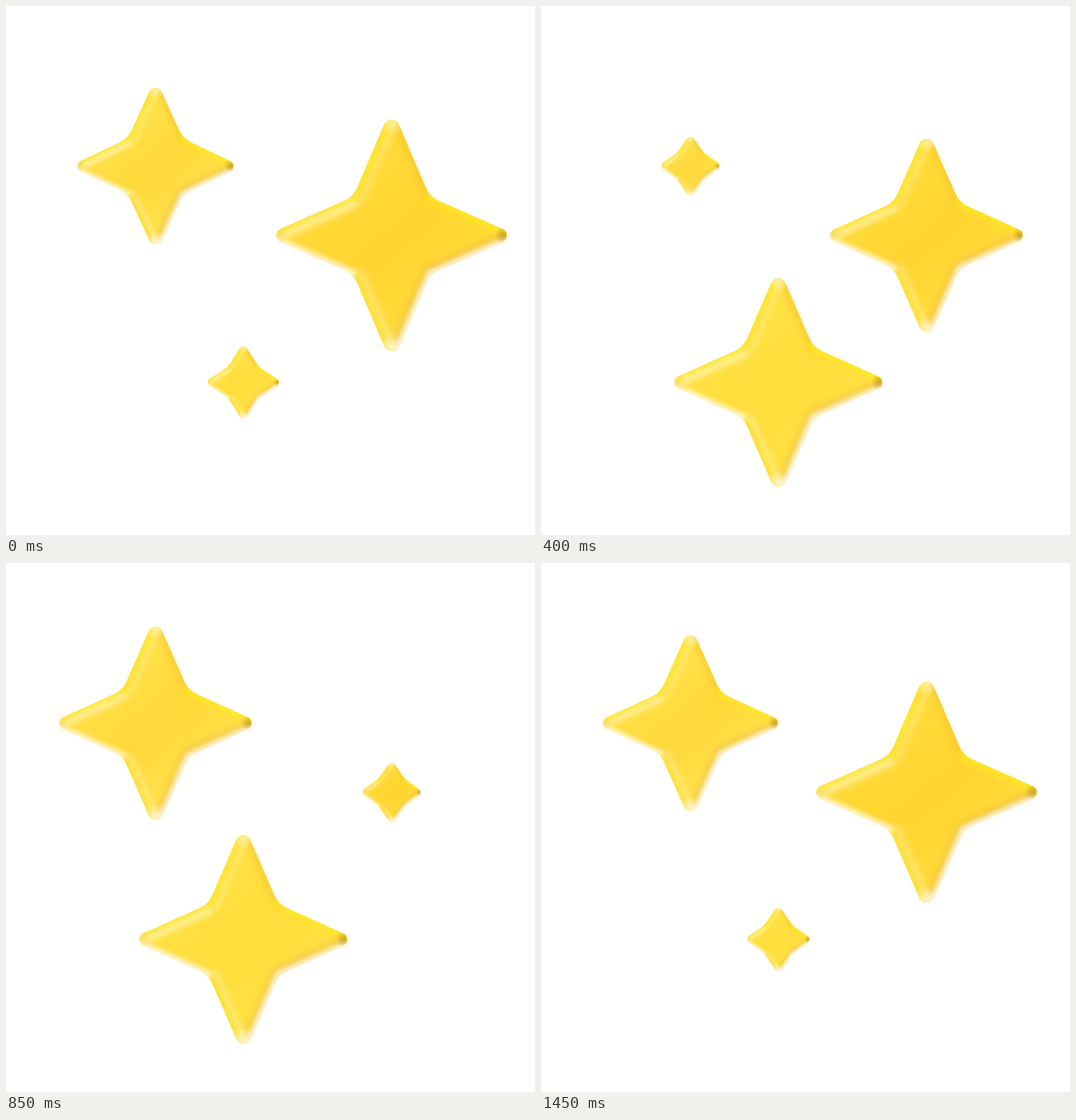
Recreate the animation shown at these times as an HTML page with a canvas. Size 600 by 600 pixels, loop 1.5 s.

```html
<!DOCTYPE html>
<html lang="en">
<head>
<meta charset="utf-8">
<title>Sparkles</title>
<style>
  html, body { margin: 0; width: 100%; height: 100%; overflow: hidden; background: #fff; }
  canvas { display: block; width: 600px; height: 600px; }
</style>
</head>
<body>
<canvas id="stage" width="600" height="600"></canvas>
<script>
const ctx = document.getElementById('stage').getContext('2d');
const LOOP = 1500, STEP = 50;

// peak: the moment at which the star is largest
const stars = [
  { x: 169.5, y: 181.5, peak: 1125, light: '#ffe148', deep: '#ffd83a' },
  { x: 437.3, y: 260, peak: 125, light: '#ffdb38', deep: '#ffd430' },
  { x: 269.2, y: 426.8, peak: 625, light: '#ffe142', deep: '#ffdd3c' }
];

function radiusAt(time, peak) {
  const phase = (time - peak) / LOOP * Math.PI * 2;
  return 86.5 + 52.2 * Math.cos(phase) - 2 * Math.cos(2 * phase);
}

// Where the sharp tip must lie so that its rounded end reaches r.
function apex(r, k, round) {
  let a = r * 1.1;
  for (let i = 0; i < 6; i++) {
    const slope = (a - k) / k;
    a = r + round * (Math.hypot(1, slope) - 1);
  }
  return a;
}

function outline(r) {
  const k = 5.5 + 0.29 * r;
  const upright = 3.7 + 0.043 * r, side = upright * 0.82;
  const v = apex(r, k, upright), h = apex(r, k, side);
  const points = {
    top: [0, -v], tr: [k, -k], right: [h, 0], br: [k, k],
    bottom: [0, v], bl: [-k, k], left: [-h, 0], tl: [-k, -k]
  };
  const corner = 28;
  return { points, rounds: [upright, corner, side, corner, upright, corner, side, corner] };
}

function starPath(points, rounds) {
  const list = Object.values(points);
  const [first, last] = [list[0], list[7]];
  const start = [(first[0] + last[0]) / 2, (first[1] + last[1]) / 2];
  const path = new Path2D();
  path.moveTo(...start);
  list.forEach((p, i) => path.arcTo(...p, ...(list[i + 1] || start), rounds[i]));
  path.closePath();
  return path;
}

function softLine(points, color, width, blur, dx = 0, dy = 0) {
  ctx.filter = `blur(${blur}px)`;
  ctx.strokeStyle = color;
  ctx.lineWidth = width;
  ctx.beginPath();
  points.forEach(([x, y]) => ctx.lineTo(x + dx, y + dy));
  ctx.stroke();
}

function glow(x, y, size, rgb, alpha) {
  const g = ctx.createRadialGradient(x, y, 0, x, y, size);
  g.addColorStop(0, `rgba(${rgb},${alpha})`);
  g.addColorStop(1, `rgba(${rgb},0)`);
  ctx.fillStyle = g;
  ctx.fillRect(x - size, y - size, size * 2, size * 2);
}

function drawStar({ x, y, peak, light, deep }, time) {
  const r = radiusAt(time, peak);
  const { points: p, rounds } = outline(r);
  const path = starPath(p, rounds);
  const u = 2 + r / 18;

  ctx.save();
  ctx.translate(x, y);
  ctx.lineJoin = ctx.lineCap = 'round';

  ctx.save();
  ctx.translate(0.8, 1);
  ctx.filter = 'blur(1.5px)';
  ctx.fillStyle = 'rgba(245,215,150,0.25)';
  ctx.fill(path);
  ctx.restore();

  const body = ctx.createLinearGradient(-r * 0.4, -r * 0.5, r * 0.4, r * 0.5);
  body.addColorStop(0, light);
  body.addColorStop(0.55, deep);
  body.addColorStop(1, light);
  ctx.fillStyle = body;
  ctx.fill(path);
  ctx.clip(path);

  const blur = u * 0.3;
  // right-hand and lower shade
  softLine([p.top, p.tr], 'rgba(246,196,45,0.5)', u * 1.4, u * 0.4);
  softLine([p.right, p.br, p.bottom], 'rgba(232,182,70,0.55)', u * 1.9, u * 0.5);
  softLine([p.right, p.br, p.bottom], 'rgba(255,249,232,0.9)', u * 0.8, blur);
  // lit rims
  softLine([p.tr, p.right], 'rgba(255,232,35,0.75)', u * 1.4, u * 0.4);
  softLine([p.left, p.tl, p.top], 'rgba(255,230,40,0.85)', u * 1.3, blur);
  softLine([p.bottom, p.bl], 'rgba(255,224,50,0.8)', u * 1.2, blur);
  softLine([p.bl, p.left], 'rgba(255,248,215,0.9)', u * 0.9, blur);
  // ridge highlights
  softLine([p.left, p.tl], 'rgba(255,248,200,0.75)', u * 0.8, u * 0.4, u * 0.3, u * 0.8);
  softLine([p.tl, p.top], 'rgba(255,243,165,0.55)', u * 0.6, u * 0.4, u, u * 0.4);
  softLine([p.bl, p.bottom], 'rgba(255,244,175,0.6)', u * 0.6, u * 0.4, u * 0.9, -u * 0.3);

  ctx.filter = 'none';
  const tip = r * 0.97, spot = u * 1.4;
  glow(0, -tip, spot, '255,246,190', 0.7);
  glow(-tip, 0, spot * 0.8, '240,205,70', 0.5);
  glow(0, tip, spot * 1.2, '255,250,225', 0.8);
  glow(tip, 0, spot * 0.8, '190,140,25', 0.7);
  ctx.restore();
}

function render() {
  // a small lead keeps each step on time with the display refresh
  const time = Math.floor((performance.now() + 8) / STEP) * STEP % LOOP;
  ctx.fillStyle = '#fff';
  ctx.fillRect(0, 0, 600, 600);
  stars.forEach(star => drawStar(star, time));
  requestAnimationFrame(render);
}
render();
</script>
</body>
</html>
```
